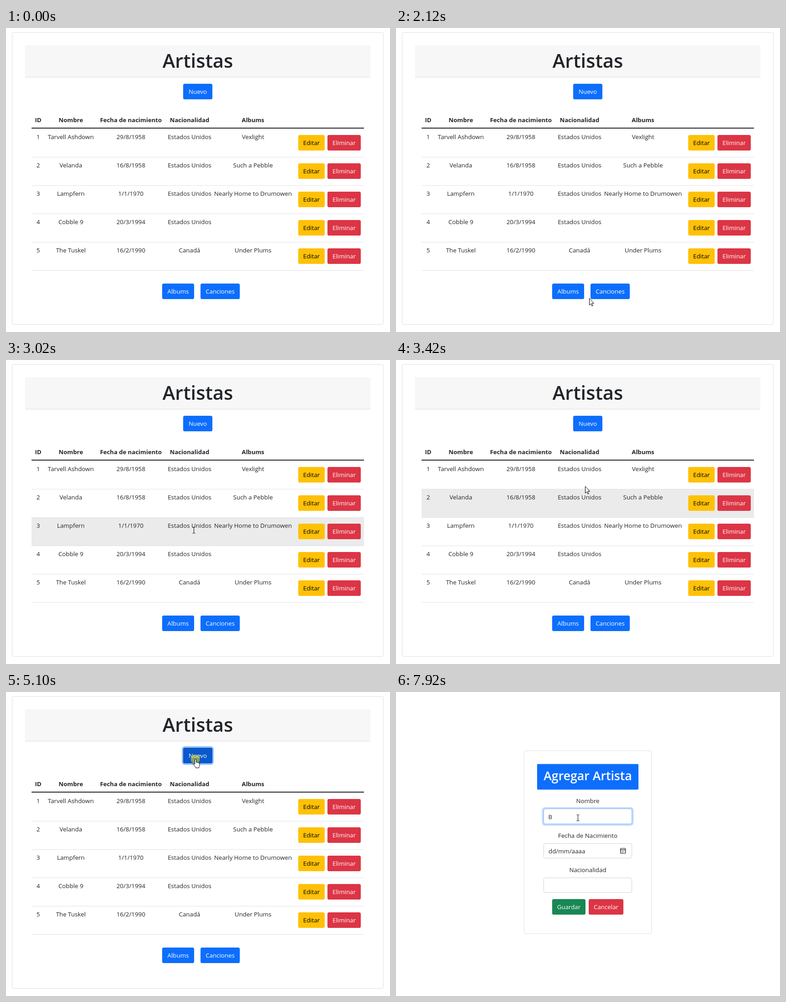
An HTML page for the animation above (8000 ms loop, 841 by 665 pixels).

```html
<!DOCTYPE html>
<html lang="es">
<head>
<meta charset="utf-8">
<title>Artistas</title>
<style>
html, body { margin: 0; width: 100%; height: 100%; overflow: hidden; background: #fff; }
svg { display: block; width: 841px; height: 665px; cursor: default; }
text { font: 13.3px "Open Sans", "Noto Sans", sans-serif; fill: #212529; text-anchor: middle; }
.head { font-size: 13.1px; font-weight: 700; }
.title { font-size: 41.6px; font-weight: 600; }
.sub { font-size: 26.7px; font-weight: 600; }
.start { text-anchor: start; }
</style>
</head>
<body>
<svg id="stage" viewBox="0 0 841 665"></svg>
<script>
const LOOP = 8000, STEP = 69;
const BLUE = '#0d6efd', RED = '#dc3545', YELLOW = '#ffc107', GREEN = '#198754';
const ROW_TOP = 221, ROW_H = 62, HOVER_LAG = 8;
const COLS = [70.5, 142, 273.5, 402, 541];
const HEADS = ['ID', 'Nombre', 'Fecha de nacimiento', 'Nacionalidad', 'Albums'];
const ROWS = [
  [1, 'Tarvell Ashdown', '29/8/1958', 'Estados Unidos', 'Vexlight'],
  [2, 'Velanda', '16/8/1958', 'Estados Unidos', 'Such a Pebble'],
  [3, 'Lampfern', '1/1/1970', 'Estados Unidos', 'Nearly Home to Drumowen'],
  [4, 'Cobble 9', '20/3/1994', 'Estados Unidos', ''],
  [5, 'The Tuskel', '16/2/1990', 'Canadá', 'Under Plums']
];

// Pointer track: time, x, y
const TRACK = [
  [1040, 749, 651], [1320, 640, 637], [1800, 426, 592], [1870, 424, 591], [2119, 424, 591],
  [2120, 423, 591], [2620, 408, 453], [2890, 410, 386], [3420, 414, 276], [3690, 416, 225],
  [4160, 414, 147], [5660, 414, 147], [5870, 396, 273], [6039, 396, 273],
  [6040, 397, 273], [6630, 397, 273], [6770, 398, 275], [LOOP, 398, 275]
];

const rect = (x, y, w, h, fill, extra = '') =>
  `<rect x="${x}" y="${y}" width="${w}" height="${h}" fill="${fill}" ${extra}/>`;
const text = (s, x, y, extra = '') => `<text x="${x}" y="${y}" ${extra}>${s}</text>`;
const button = (s, x, y, w, fill, color = '#fff', id = '') =>
  rect(x, y, w, 34, fill, `rx="3.6" ${id}`) + text(s, x + w / 2, y + 22, `style="fill:${color}"`);
const outline = (x, y, w, h, color, extra = '') =>
  rect(x, y, w, h, '#fff', `rx="3.6" stroke="${color}" ${extra}`);

const listPage = () =>
  outline(13.5, 9.5, 813, 639, '#dfdfdf') +
  rect(42, 38, 756, 69.5, '#f7f7f7') + rect(42, 107, 756, 1, '#dcdcdc') +
  text('Artistas', 420, 87, 'class="title"') +
  rect(385, 118.5, 70, 41, '#98c1fe', 'rx="7" id="newRing"') +
  button('Nuevo', 388, 122, 64, BLUE, '#fff', 'id="newBtn"') +
  HEADS.map((s, i) => text(s, COLS[i], 206, 'class="head"')).join('') +
  rect(56, 218, 728, 2, '#212529') +
  rect(56, 0, 728, ROW_H - 1, '#ebebeb', 'id="hover"') +
  ROWS.map((row, r) => {
    const y = ROW_TOP + r * ROW_H;
    return row.map((s, i) => text(s, COLS[i], y + 22)).join('') +
      rect(56, y + ROW_H - 1, 728, 1, '#dee2e6') +
      button('Editar', 640, y + 13, 58, YELLOW, '#000') +
      button('Eliminar', 704, y + 13, 73, RED);
  }).join('') +
  button('Albums', 342, 559, 70, BLUE) + button('Canciones', 426, 559, 86, BLUE);

const calendar = () =>
  '<g fill="none" stroke="#111" stroke-width="1.2"><rect x="491.6" y="342" width="11" height="11" rx="1.5"/>' +
  '<path d="M491.6 345H502.6"/><path d="M494 348H501M494 350.5H499" stroke-dasharray="1.5 1"/></g>';

const formPage = () =>
  outline(280.5, 128.5, 279, 400, '#dfdfdf') +
  rect(309, 157.5, 222, 56, BLUE, 'rx="2"') +
  text('Agregar Artista', 420, 192.5, 'class="sub" style="fill:#fff"') +
  text('Nombre', 420, 243) + text('Fecha de Nacimiento', 420, 318.5) + text('Nacionalidad', 420, 393.5) +
  rect(319.5, 252, 201, 40.5, '#c2dbfe', 'rx="7" id="fieldRing"') +
  outline(323.5, 255.5, 193, 33, '#ced4da', 'id="field"') +
  outline(323.5, 331.5, 193, 32, '#ced4da') + outline(323.5, 406.5, 193, 32, '#ced4da') +
  text('dd/mm/aaaa', 334, 353, 'class="start"') + calendar() +
  text('B', 333.5, 277.5, 'class="start" id="typed"') +
  rect(334, 262, 1, 19, '#000', 'id="caret"') +
  button('Guardar', 342, 453, 73, GREEN) + button('Cancelar', 422, 453, 76, RED);

const pointers = () =>
  '<circle id="press" r="10" fill="#ffeb00" opacity=".5"/>' +
  '<g id="pointer" stroke="#000" fill="#fff" stroke-linejoin="round">' +
  '<path id="arrow" d="M.5.5V15.2L3.8 12 6 17.2 8.2 16.3 6 11.2H10.5Z"/>' +
  '<path id="hand" d="M-.5 11V1a1.6 1.6 0 0 1 3.2 0V7q2.4-1 2.9.5 2.2-.8 2.6.8 1.8-.2 1.8 1.6V13q0 2.5-1.5 4.2V19H1.5V17.5Q-2.5 13.5-4.5 10.3q.5-2 4 1Z"/>' +
  '<path id="beam" fill="none" d="M-2.5-6.5Q.5-6.5.5-5.5.5-6.5 3.5-6.5M.5-5.5V6M-2.5 7Q.5 7 .5 6 .5 7 3.5 7"/></g>';

const stage = document.getElementById('stage');
stage.innerHTML = `<g id="list">${listPage()}</g><g id="form">${formPage()}</g>${pointers()}`;
const el = {};
stage.querySelectorAll('[id]').forEach(e => el[e.id] = e);
const show = (id, on) => el[id].setAttribute('display', on ? 'inline' : 'none');
const within = (v, a, b) => v >= a && v < b;

function pointerAt(t) {
  if (t <= TRACK[0][0]) return TRACK[0].slice(1);
  const i = TRACK.findIndex(k => k[0] > t);
  const [t0, x0, y0] = TRACK[i - 1], [t1, x1, y1] = TRACK[i];
  const n = Math.max(1, Math.round((t1 - t0) / STEP));
  const k = Math.floor((t - t0) / (t1 - t0) * n + 1e-6) / n;
  return [Math.round(x0 + (x1 - x0) * k), Math.round(y0 + (y1 - y0) * k)];
}

function pointerKind(y, onForm) {
  if (onForm) return y > 157 ? 'beam' : 'arrow';
  if (y < 156) return 'hand';
  const overCell = within(y, ROW_TOP, 531) && within((y - ROW_TOP) % ROW_H, 8, 28);
  return overCell || within(y, 192, 212) ? 'beam' : 'arrow';
}

function draw(t) {
  const onForm = t >= 5170;
  const [x, y] = pointerAt(t);
  const kind = pointerKind(y, onForm);
  show('list', !onForm);
  show('form', onForm);

  // Row highlight trails the rising pointer slightly.
  const row = Math.floor((y + HOVER_LAG - ROW_TOP) / ROW_H);
  show('hover', within(row, 0, ROWS.length));
  el.hover.setAttribute('y', ROW_TOP + row * ROW_H);

  const pressed = t >= 5030;
  show('newRing', pressed);
  el.newBtn.setAttribute('fill', pressed ? '#0a58ca' : kind === 'hand' ? '#0b5ed7' : BLUE);

  const focused = t >= 6240, typed = t >= 7300;
  show('fieldRing', focused);
  el.field.setAttribute('stroke', focused ? '#86b7fe' : '#ced4da');
  show('typed', typed);
  show('caret', within(t, 6240, 6770) || within(t, 7300, 7920));
  el.caret.setAttribute('x', typed ? 342 : 334);

  show('press', within(t, 5030, 5170) || within(t, 6240, 6370));
  el.press.setAttribute('cx', x + .5);
  el.press.setAttribute('cy', y);
  show('pointer', t >= 1040);
  el.pointer.setAttribute('transform', `translate(${x} ${y})`);
  for (const k of ['arrow', 'hand', 'beam']) show(k, k === kind);
}

const start = performance.now();
function tick() {
  draw((performance.now() - start) % LOOP);
  requestAnimationFrame(tick);
}
tick();
</script>
</body>
</html>
```
